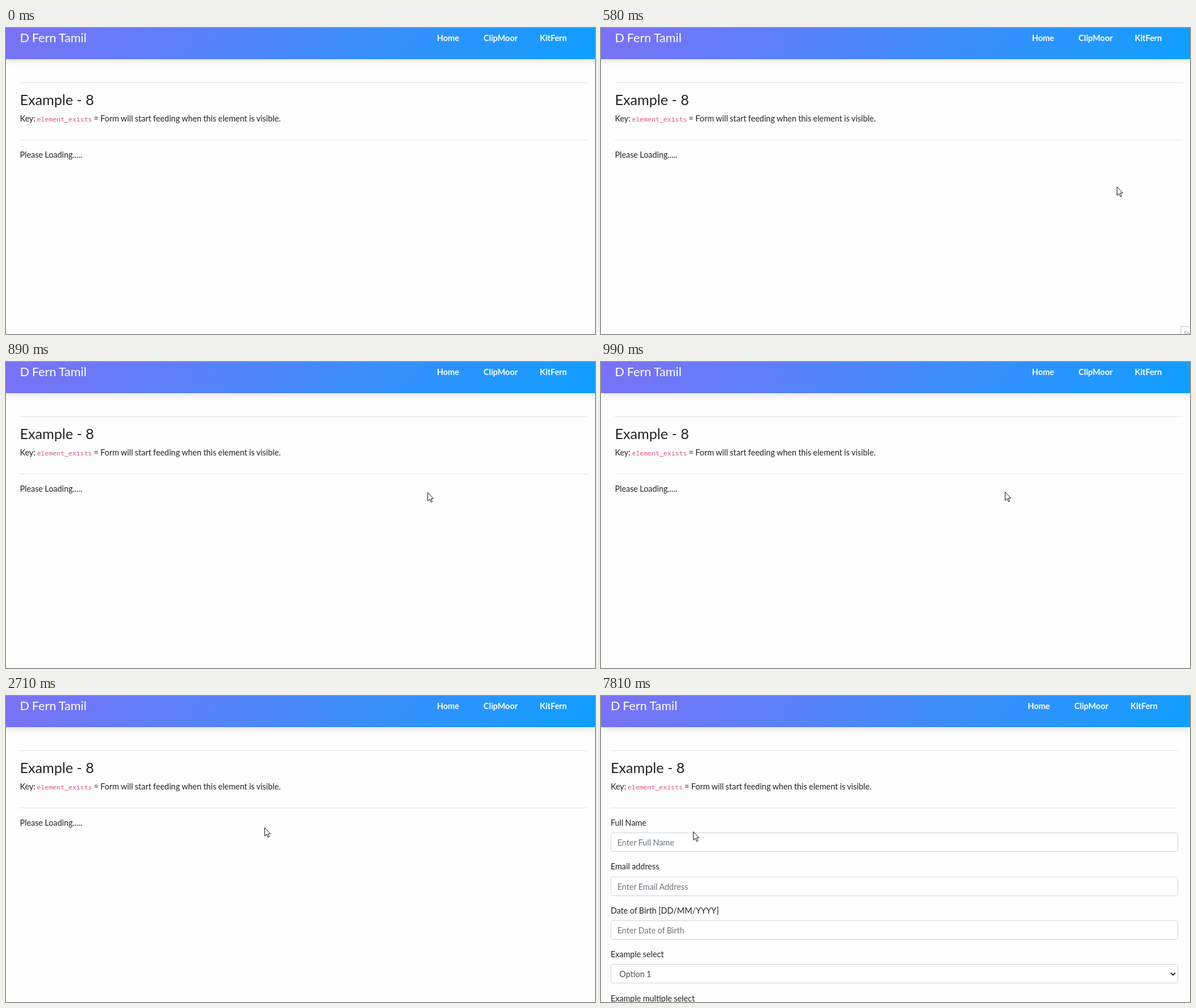
An HTML page that plays this animation: 1037x540 px, repeating every 8000 ms.

```html
<!DOCTYPE html>
<html lang="en">
<head>
<meta charset="utf-8">
<style>
  html, body { margin: 0; width: 100%; height: 100%; overflow: hidden; }
  body { position: relative; background: #fdfdfd; color: #212529; font: 14.4px/21.6px Lato, sans-serif; }
  body * { position: absolute; box-sizing: border-box; white-space: pre; word-spacing: var(--gap); }
  #bar { left: 0; top: -20px; width: 1037px; height: 75px;
    background: linear-gradient(135deg, #7f70f5, #0ea0ff); box-shadow: 0 3px 10px rgba(0, 0, 0, .11); }
  #page { top: 0; left: 24.4px; width: 999.3px; height: 540px; }
  .brand { top: 1px; font-size: 21.6px; line-height: 32px; color: #fff; }
  .link { top: 6.6px; font-weight: 700; color: #fff; }
  .rule { left: 0; width: 100%; height: 1px; background: #e4e4e4; }
  .title { top: 111.4px; font-size: 25.2px; line-height: 30.2px; word-spacing: 0; }
  .key { top: 148.9px; }
  code { top: 149.5px; left: 30px; font: 11.55px/21.6px "Noto Sans Mono", monospace; color: #e0527f; }
  #loading { top: 213px; }
  #form { top: 0; left: 0; width: 100%; height: 100%; }
  .field { left: 0; width: 100%; height: 34.2px; padding: 0 10.8px; line-height: 34.2px;
    background: #fff; border: 1px solid #ced4da; border-radius: 3.6px; color: #6c757d; }
  .select { padding-left: 14.4px; color: #495057; }
  .select svg { right: 3px; top: 12px; }
  #tip { left: 1020px; top: 526px; width: 90px; height: 24px; padding-left: 4px;
    border: 2px solid #dcdcdc; background: #fff; color: #999; font-size: 11px; line-height: 22px; }
  #cursor { left: 0; top: 0; }
</style>
</head>
<body>
<div id="bar"></div>
<div id="page">
  <div class="brand">D Fern Tamil</div>
  <div class="link" style="left:734.4px">Home</div>
  <div class="link" style="left:816.4px">ClipMoor</div>
  <div class="link" style="left:915.4px">KitFern</div>
  <div class="rule" style="top:96px"></div>
  <div class="title">Example - 8</div>
  <div class="key">Key:</div>
  <code>element_exists</code>
  <div class="key" style="left:130.2px">= Form will start feeding when this element is visible.</div>
  <div class="rule" style="top:197px"></div>
  <div id="loading">Please Loading.....</div>
  <div id="form"></div>
</div>
<div id="tip">Start here</div>
<svg id="cursor" width="13" height="20">
  <path d="M.5 .5V15.2L4 12 6.4 17.5 8.6 16.5 6.2 11.2H10.6Z" fill="#fff" stroke="#111"/>
</svg>
<script>
const $ = id => document.getElementById(id);
const show = (id, on) => $(id).style.visibility = on ? "visible" : "hidden";

// Keep word gaps even whatever the installed cut of the font.
const pen = document.createElement("canvas").getContext("2d");
pen.font = "100px Lato, sans-serif";
document.body.style.setProperty("--gap", `${0.23 - pen.measureText(" ").width / 100}em`);

const fields = [
  ["Full Name", "Enter Full Name"],
  ["Email address", "Enter Email Address"],
  ["Date of Birth [DD/MM/YYYY]", "Enter Date of Birth"],
  ["Example select", "Option 1"],
  ["Example multiple select"]
];
const chevron = `<svg width="10" height="9"><path d="M1 2.5 5 6.5 9 2.5" fill="none" stroke="#222" stroke-width="1.8"/></svg>`;
$("form").innerHTML = fields.map(([label, hint], i) => {
  const top = 213 + i * 77.4;
  const select = i === 3;
  const box = hint ? `<div class="field ${select ? "select" : ""}" style="top:${top + 28.1}px">${hint}${select ? chevron : ""}</div>` : "";
  return `<div style="top:${top}px">${label}</div>${box}`;
}).join("");

// Pointer stops: time, x, y
const stops = [
  [0, 1100, 600], [430, 1030, 400], [510, 972, 340], [580, 908, 280], [660, 878, 258],
  [750, 848, 239], [810, 800, 233], [890, 742, 230], [990, 711, 229],
  [2610, 638, 229], [2710, 455, 232], [2780, 270, 237], [2860, 162, 239]
];

function draw(now) {
  const t = now % 8000;
  const [, x, y] = stops.findLast(([start]) => start <= t);
  const loaded = t >= 7810;
  $("cursor").style.transform = `translate(${x}px, ${y}px)`;
  $("page").style.left = loaded ? "16.9px" : "24.4px";
  show("tip", t >= 430 && t < 660);
  show("loading", !loaded);
  show("form", loaded);
  requestAnimationFrame(draw);
}
draw(performance.now());
</script>
</body>
</html>
```
